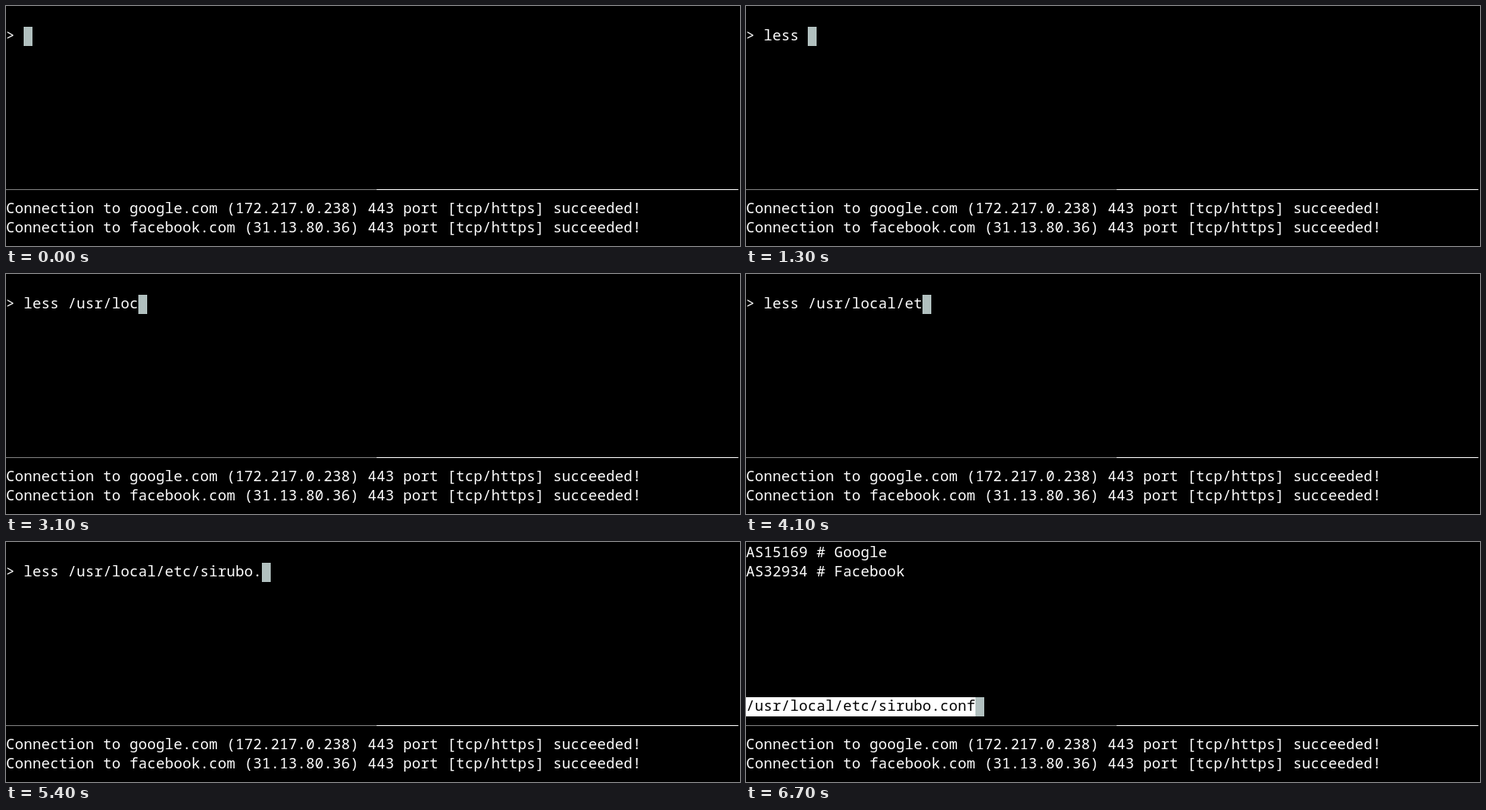
An HTML page that plays this animation: 915x300 px, repeating every 8 s.

```html
<!DOCTYPE html>
<html lang="en">
<head>
<meta charset="utf-8">
<title>Terminal</title>
<style>
  html, body { margin: 0; width: 100%; height: 100%; overflow: hidden; background: #000; }
  svg { display: block; width: 915px; height: 300px; background: #000; }
  text { font: 18px "Noto Sans Mono", "DejaVu Sans Mono", monospace; fill: #fff; white-space: pre; }
  .inverse { fill: #000; }
</style>
</head>
<body>
<svg id="screen" viewBox="0 0 915 300">
  <g shape-rendering="crispEdges">
    <rect x="0" y="229" width="462" height="1" fill="#808080"/>
    <rect x="462" y="229" width="451" height="1" fill="#fff"/>
    <rect id="status" x="0" y="194" width="286" height="24" fill="#fff"/>
    <rect id="cursor" width="11" height="24" fill="#b1c0bf"/>
  </g>
</svg>
<script>
const LOOP = 8000, OPEN = 6700;
const CELL = 11, ROW = 24, TOP = 2, BASE = 17;
const PROMPT = "> ";
const FILE = "/usr/local/etc/sirubo.conf";

// Keystrokes: time in ms and the characters that appear then
const KEYS = [
  [500, "le"], [700, "s"], [900, "s"], [1300, " "], [1700, "/"],
  [2000, "u"], [2100, "s"], [2300, "r"], [2500, "/"],
  [2800, "l"], [3000, "o"], [3100, "c"], [3300, "al"], [3700, "/"],
  [3900, "e"], [4100, "t"], [4400, "c"], [4700, "/"],
  [5000, "s"], [5100, "i"], [5200, "r"], [5400, "ubo."],
  [6100, "c"], [6200, "o"], [6400, "nf "]
];

const screen = document.getElementById("screen");
const status = document.getElementById("status");
const cursor = document.getElementById("cursor");

function addLine(row, content = "", className = "") {
  const el = document.createElementNS("http://www.w3.org/2000/svg", "text");
  el.setAttribute("y", TOP + row * ROW + BASE);
  el.setAttribute("class", className);
  screen.append(el);
  setLine(el, content);
  return el;
}

// One x per character keeps the text on the terminal grid
function setLine(el, content) {
  if (el.textContent === content && content) return;
  el.setAttribute("x", Array.from(content, (_, i) => i * CELL).join(" "));
  el.textContent = content;
}

function show(el, visible) {
  el.setAttribute("visibility", visible ? "visible" : "hidden");
}

function moveCursor(col, row) {
  cursor.setAttribute("x", col * CELL);
  cursor.setAttribute("y", TOP + row * ROW);
}

addLine(10, "Connection to google.com (172.217.0.238) 443 port [tcp/https] succeeded!");
addLine(11, "Connection to facebook.com (31.13.80.36) 443 port [tcp/https] succeeded!");
const command = addLine(1, PROMPT);
const pager = [
  addLine(0, "AS15169 # Google"),
  addLine(1, "AS32934 # Facebook"),
  addLine(8, FILE, "inverse"),
  status
];

function render(time) {
  const t = time % LOOP;
  const open = t >= OPEN;
  const typed = KEYS.filter(([at]) => at <= t).map(([, keys]) => keys).join("");
  const line = PROMPT + typed;
  setLine(command, line);
  show(command, !open);
  pager.forEach(el => show(el, open));
  if (open) moveCursor(FILE.length, 8);
  else moveCursor(line.length, 1);
}

const start = performance.now();
function tick() {
  render(performance.now() - start);
  requestAnimationFrame(tick);
}
tick();
</script>
</body>
</html>
```
